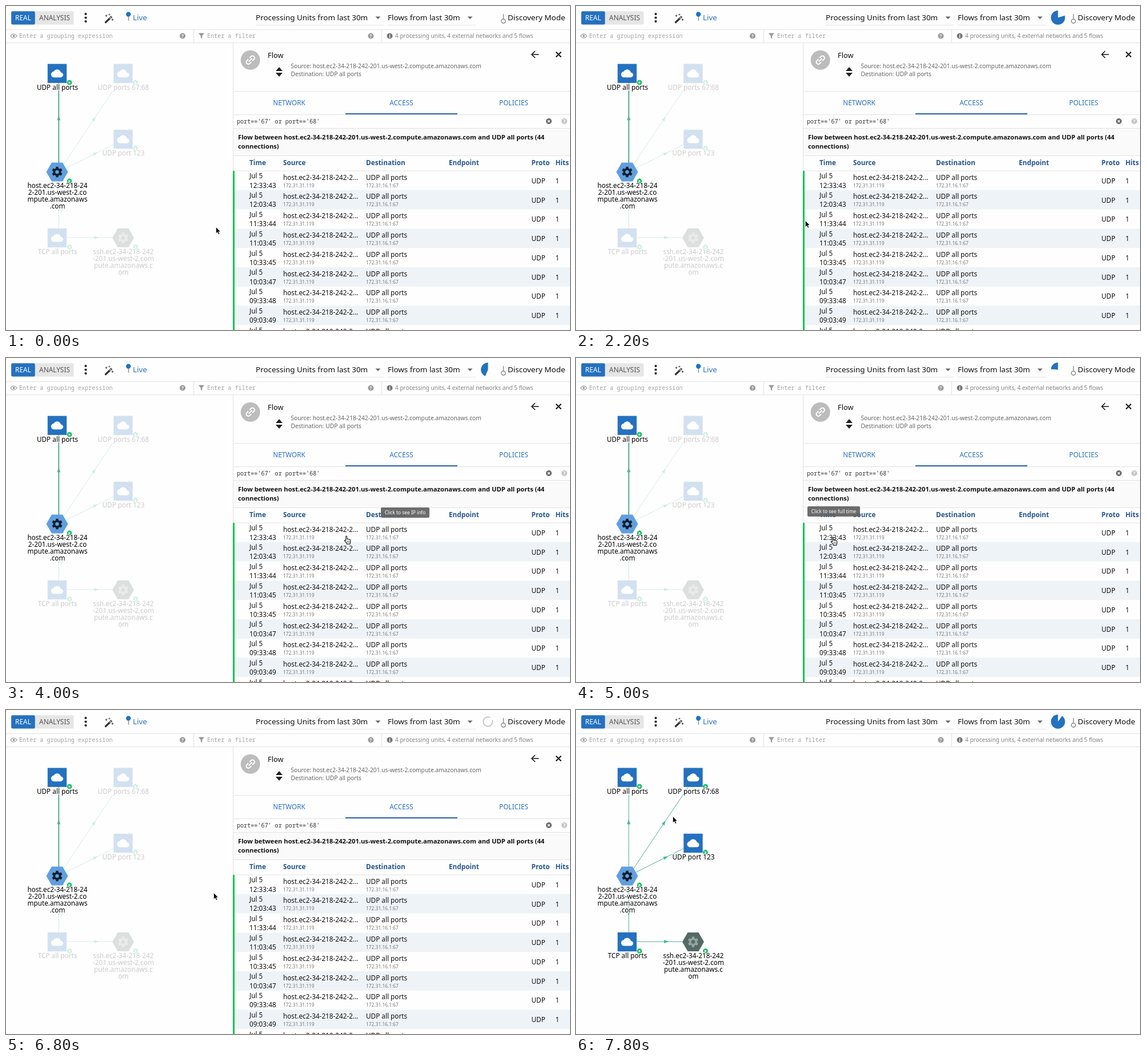
Recreate the animation shown at these times as an HTML page. Size 987x568 px, loop 8 s.

```html
<!DOCTYPE html>
<html lang="en">
<head>
<meta charset="utf-8">
<title>Network flow console</title>
<style>
  html, body { margin: 0; width: 100%; height: 100%; overflow: hidden; background: #fefefe; }
  svg { display: block; width: 987px; height: 568px; }
  text { font-family: "Noto Sans", sans-serif; font-size: 11.76px; fill: #111; white-space: pre; }
  .mono { font-family: "Noto Sans Mono", monospace; font-size: 10.1px; }
  .label { text-anchor: middle; fill: #000; stroke: #fefefe; stroke-width: 2.4px; paint-order: stroke; }
  .backing * { fill: #fefefe; stroke: #fefefe; }
</style>
</head>
<body>
<svg id="stage" viewBox="0 0 987 568"></svg>
<script>
const LOOP = 8000, STEP = 200;
const BLUE = '#2471bf', LINK = '#2a70b8', GREY = '#999', RULE = '#e2e2e2';
const HOST = 'host.ec2-34-218-242-201.us-west-2.compute.amazonaws.com';

const text = (x, y, s, attrs = '') => `<text x="${x}" y="${y}" ${attrs}>${s}</text>`;
const rect = (x, y, w, h, fill, attrs = '') =>
  `<rect x="${x}" y="${y}" width="${w}" height="${h}" fill="${fill}" ${attrs}/>`;
const circle = (x, y, r, fill, attrs = '') =>
  `<circle cx="${x}" cy="${y}" r="${r}" fill="${fill}" ${attrs}/>`;
const path = (d, fill, attrs = '') => `<path d="${d}" fill="${fill}" ${attrs}/>`;
const line = (d, stroke, width = 1, attrs = '') =>
  path(d, 'none', `stroke="${stroke}" stroke-width="${width}" ${attrs}`);
const group = (content, attrs) => `<g ${attrs}>${content}</g>`;
const at = (x, y, content) => group(content, `transform="translate(${x} ${y})"`);
const size = px => `font-size:${px}px;`;
const sign = (x, y, s, fill) => circle(x, y, 5, fill) +
  text(x, y + 3, s, `text-anchor="middle" style="${size(8.4)}font-weight:700;fill:#fff"`);

// Toolbar and filter row

function toolbar() {
  const big = `style="${size(13.44)}"`;
  const button = `text-anchor="middle" style="${size(11.9)}font-weight:500;fill:`;
  const dropdown = (x, caret, end, s) => text(x, 25, s, big) +
    path(`M${caret - 4.5} 18.5h9l-4.5 4.5z`, '#666') + line(`M${x} 33.5H${end}`, RULE);
  const dots = [14, 20.5, 27].map(y => circle(139.5, y, 2.1, '#222')).join('');
  const wand = line('M173.5 29.5L185 18.5', '#333', 3.2) + line('M181.5 22l2.5-2.4', '#fff', 1.2) +
    line('M175.5 15v4M173.5 17h4M181 13.5v3M179.5 15h3M186.5 22v4M184.5 24h4', '#444', 1);
  const hint = (x, s) => text(x, 56.3, s, 'class="mono" style="fill:#a4a4a4"');

  return rect(9.2, 9.2, 109.4, 23.2, '#e6e6e6', 'rx="2.5"') + rect(9.2, 9.2, 41.6, 23.2, BLUE, 'rx="2.5"') +
    text(30, 24.8, 'REAL', button + '#fff"') + text(85, 24.8, 'ANALYSIS', button + '#555"') +
    dots + wand +
    line('M214.5 16V26', '#8a8a8a', 1.4) + circle(214.2, 14.5, 4.2, '#1d73c4') +
    text(222, 25, 'Live', `style="${size(13.44)}fill:${LINK}"`) +
    dropdown(437, 651, 661, 'Processing Units from last 30m') +
    dropdown(668, 812, 822, 'Flows from last 30m') +
    line('M870.5 14V23', '#888', 1.3) + circle(870.5, 26.5, 3.6, '#fff', 'stroke="#777" stroke-width="1.3"') +
    text(878, 25, 'Discovery Mode', big) +
    line('M0 41.5H987M0 64.5H987M328.5 41V64M657.5 41V64', RULE) +
    line('M8 52.5Q13.5 45.5 19 52.5Q13.5 59.5 8 52.5Z', GREY, 1.2) + circle(13.5, 52.5, 1.9, GREY) +
    hint(23, 'Enter a grouping expression') + sign(309, 52.5, '?', GREY) +
    path('M337 47.5h10l-3.8 5v5l-2.4-2v-3z', GREY) +
    hint(352, 'Enter a filter') + sign(638.5, 52.5, '?', GREY) + sign(671.5, 52.5, 'i', '#777') +
    text(681, 56.2, '4 processing units, 4 external networks and 5 flows', `style="${size(10.08)}fill:#848484"`);
}

// Graph

const NODES = {
  all:  { x: 89.5, y: 118.2, lines: ['UDP all ports'] },
  dhcp: { x: 205, y: 118.2, lines: ['UDP ports 67:68'] },
  ntp:  { x: 205, y: 233.5, lines: ['UDP port 123'] },
  host: { x: 89.5, y: 291, lines: ['host.ec2-34-218-24', '2-201.us-west-2.co', 'mpute.amazonaws', '.com'],
          hex: '#609fdf', gear: '#0f1d2c' },
  tcp:  { x: 89.5, y: 406.5, lines: ['TCP all ports'] },
  ssh:  { x: 205, y: 406.5, lines: ['ssh.ec2-34-218-242', '-201.us-west-2.com', 'pute.amazonaws.c', 'om'],
          hex: '#536a65', gear: '#95a39f' }
};
const EDGES = [['host', 'all'], ['host', 'dhcp'], ['host', 'ntp'], ['host', 'tcp'], ['tcp', 'ssh']];
const CLOUD = 'M19.35 10.04C18.67 6.59 15.64 4 12 4 9.11 4 6.6 5.64 5.35 8.04 2.34 8.36 0 10.91 0 14' +
  'c0 3.31 2.69 6 6 6h13c2.76 0 5-2.24 5-5 0-2.64-2.05-4.78-4.65-4.96z';

function gearPath(teeth, outer, inner, hole) {
  const corners = [[inner, -19], [outer, -13], [outer, 13], [inner, 19]];
  const points = [];
  for (let i = 0; i < teeth; i++) {
    for (const [r, offset] of corners) {
      const a = (i * 360 / teeth + offset) * Math.PI / 180;
      points.push(`${(r * Math.sin(a)).toFixed(2)} ${(-r * Math.cos(a)).toFixed(2)}`);
    }
  }
  return `M${points.join('L')}ZM${-hole} 0a${hole} ${hole} 0 1 0 ${2 * hole} 0a${hole} ${hole} 0 1 0 ${-2 * hole} 0Z`;
}
const GEAR = gearPath(6, 9.4, 7, 3.3);

function edge([from, to]) {
  const a = NODES[from], b = NODES[to];
  const x = a.x + 2.8, y = a.y - 0.4, dx = b.x - a.x, dy = b.y - a.y;
  const angle = Math.atan2(dy, dx) * 180 / Math.PI;
  const arrow = path('M4 -3L12.5 0L4 3z', '#4bb899');
  return line(`M${x} ${y}l${dx} ${dy}`, '#4fae95', 1, to === 'all' ? 'id="mainEdge"' : '') +
    group(arrow, `transform="translate(${x + dx / 2} ${y + dy / 2}) rotate(${angle})"`);
}

function node({ x, y, lines, hex, gear }) {
  const icon = hex
    ? path('M-19 0L-9.5 -16.5H9.5L19 0L9.5 16.5H-9.5Z', hex) + path(GEAR, gear, 'fill-rule="evenodd"')
    : rect(-16.7, -16.7, 33.4, 33.4, BLUE) + group(path(CLOUD, '#fff'), 'transform="scale(.88) translate(-12 -12)"');
  const badge = at(21.6, 16, circle(0, 0, 4.4, '#1fbd62') + path('M-1.4 -2.2L2.2 0L-1.4 2.2z', '#fff'));
  const label = lines.map((s, i) => text(0.5, 28.4 + 11.9 * i, s, 'class="label"')).join('');
  return at(x, y, icon + badge + label);
}

function graph() {
  const active = ['all', 'host'];
  const rest = Object.keys(NODES).filter(key => !active.includes(key));
  const draw = keys => keys.map(key => node(NODES[key])).join('');
  // The opaque backing keeps edges from showing through faded nodes.
  return group(EDGES.slice(1).map(edge).join(''), 'id="otherEdges"') + edge(EDGES[0]) +
    group(draw(rest), 'class="backing"') + group(draw(rest), 'id="otherNodes"') + draw(active);
}

// Flow panel

function tableRow(time, i) {
  const y = 289 + 33.78 * i;
  const address = (x, s) => text(x, y + 28.7, s, `style="${size(8.4)}fill:#777"`);
  return (i % 2 ? rect(400, y, 587, 33.8, '#eef3f7') : '') +
    text(426, y + 13.4, 'Jul 5') + text(426, y + 29.7, time) +
    text(485, y + 15.6, 'host.ec2-34-218-242-2...') + address(485, '172.31.31.119') +
    text(630, y + 15.6, 'UDP all ports') + address(630, '172.31.16.1:67') +
    text(919.5, y + 21.8, 'UDP') + text(961.5, y + 21.8, '1');
}

function panel() {
  const times = ['12:33:43', '12:03:43', '11:33:44', '11:03:45', '10:33:45', '10:03:47', '09:33:48', '09:03:49', '08:33:50'];
  const heads = [[426, 'Time'], [485, 'Source'], [630, 'Destination'], [775, 'Endpoint'], [919.5, 'Proto'], [961.5, 'Hits']];
  const tabs = [[495.5, 'NETWORK'], [692, 'ACCESS'], [888.5, 'POLICIES']];
  const detail = `style="${size(10.22)}fill:#666"`;
  const title = `style="${size(11.2)}font-weight:700"`;
  const link = 'M-1.5 -3.5H-5.2a3.5 3.5 0 0 0 0 7H-1.5M1.5 -3.5H5.2a3.5 3.5 0 0 1 0 7H1.5M-4 0H4';

  return rect(397, 65, 590, 503, '#fefefe') + rect(397, 215, 590, 47, '#fafafa') +
    line('M397.5 65V568M397 149.5H987M397 190.5H987M397 214.5H987M397 262.5H987M397 289H987', RULE) +
    circle(427.7, 94.7, 17, '#bcbcbc') +
    group(line(link, '#fff', 2), 'transform="translate(427.7 94.7) rotate(-45)"') +
    text(458, 91, 'Flow', `style="${size(12.8)}"`) +
    path('M472 114h12l-6-7zM472 117h12l-6 7z', '#222') +
    text(498.5, 108.8, 'Source: ' + HOST, detail) + text(498.5, 123.2, 'Destination: UDP all ports', detail) +
    line('M932.5 85H920.5M926 79L920 85L926 91', '#111', 1.5) +
    line('M962.5 80.5l9 9M971.5 80.5l-9 9', '#111', 1.9) +
    tabs.map(([x, s]) => text(x, 174.2, s, `text-anchor="middle" style="fill:${LINK}"`)).join('') +
    rect(594, 188, 196, 2, '#2c6ca8') +
    text(404, 205.5, "port=='67' or port=='68'", 'class="mono" style="fill:#333"') +
    circle(950, 202, 5, '#666') + line('M948 200l4 4M952 200l-4 4', '#fff', 1.2) + sign(977, 202, '?', '#c4c4c4') +
    text(406, 234.3, `Flow between ${HOST} and UDP all ports (44`, title) + text(406, 250, 'connections)', title) +
    heads.map(([x, s]) => text(x, 279.3, s, 'style="font-weight:700;fill:#23568c"')).join('') +
    times.map(tableRow).join('') + rect(397, 289, 3, 279, '#12c455');
}

const tooltip = (id, x, y, w, s) => group(
  rect(x, y, w, 18, '#616161', 'rx="2" opacity=".93"') +
  text(x + w / 2, y + 12, s, `text-anchor="middle" style="${size(8.4)}fill:#fff"`), `id="${id}"`);

const ring = (id, x, y) => at(x, y,
  group(line('M8.2 0A8.2 8.2 0 1 1 6.28 -5.27', '#b5b5b5', 1.3), `id="${id}"`));

const HAND = 'M2.6 8V1.2q0-1.2 1-1.2t1 1.2V5.5q1.8-.9 2.2.3q1.6-.7 2.1.4q2-.4 2 1.3v2.8q0 1.3-.8 2.3v1.5H4.3' +
  'v-1.3L.5 8.7q-.6-1.6.8-1.5z';
const cursors =
  path('M0 0V11.6L2.7 9.1L4.5 13.2L6.5 12.3L4.7 8.4H8.2Z', '#000',
    'id="arrow" transform="translate(.4 -.6)" stroke="#fff" stroke-width=".8"') +
  group(path(HAND, '#fff', 'stroke="#222" stroke-width="1.1"') + line('M5 8v4M7 8v4M9 8v4', '#333', .7), 'id="hand"');

document.getElementById('stage').innerHTML =
  rect(0, 0, 987, 568, '#fefefe') + graph() + toolbar() + group(panel(), 'id="panel"') +
  path('', BLUE, 'id="pie"') + ring('topRing', 843.3, 20.3) + ring('panelRing', 964, 87) +
  tooltip('ipTip', 656, 262, 85, 'Click to see IP info') +
  tooltip('timeTip', 405, 260, 92, 'Click to see full time') +
  group(cursors, 'id="pointer"');

// Animation

const el = id => document.getElementById(id);
const show = (id, on) => el(id).setAttribute('display', on ? 'inline' : 'none');
const between = (t, from, to) => t >= from && t < to;

// time, x, y
const TRACK = [
  [0, 367, 388], [1400, 366, 388], [2000, 366, 388], [2800, 589, 316], [3200, 592, 312], [4000, 592, 312],
  [4800, 446, 314], [5400, 446, 314], [6400, 363, 321], [6800, 363, 321], [7000, 366, 312], [7800, 169, 187]
];

function pointerAt(t) {
  const i = TRACK.findIndex(key => key[0] > t);
  if (i < 0) return TRACK[TRACK.length - 1].slice(1);
  const [t0, x0, y0] = TRACK[i - 1], [t1, x1, y1] = TRACK[i];
  const p = (t - t0) / (t1 - t0), k = p * p * (3 - 2 * p);
  return [x0 + (x1 - x0) * k, y0 + (y1 - y0) * k];
}

// Five-second countdown: the missing sector grows clockwise from the top.
function piePath(elapsed) {
  const a = elapsed / 5000 * 2 * Math.PI, cx = 843.5, cy = 20.4, r = 12.4;
  return `M${cx} ${cy}L${cx + r * Math.sin(a)} ${cy - r * Math.cos(a)}` +
    `A${r} ${r} 0 ${a < Math.PI ? 1 : 0} 1 ${cx} ${cy - r}Z`;
}

function render(t) {
  const started = t >= 7310 ? 7310 : 1190;
  const counting = between(t, 1190, 6190) || t >= 7310;
  show('pie', counting);
  if (counting) el('pie').setAttribute('d', piePath(t - started));
  show('topRing', !counting && t >= 200);
  show('panelRing', between(t, 7000, 7400));
  for (const id of ['topRing', 'panelRing']) el(id).setAttribute('transform', `rotate(${(t * 0.3 + 100) % 360})`);

  const open = t < 7000;
  show('panel', open);
  el('otherNodes').setAttribute('opacity', open ? .2 : t < 7200 ? .52 : t < 7400 ? .82 : 1);
  el('otherEdges').setAttribute('opacity', open ? .24 : t < 7200 ? .65 : 1);
  el('mainEdge').setAttribute('stroke-width', open ? 2 : t < 7200 ? 1.2 : 1);

  show('ipTip', between(t, 3000, 4200));
  show('timeTip', between(t, 4800, 5600));

  const [x, y] = pointerAt(t);
  const overCell = open && x > 425 && y > 289 && y < 330;
  el('pointer').setAttribute('transform', `translate(${x} ${y})`);
  show('arrow', !overCell);
  show('hand', overCell);
}

const start = performance.now();
function tick() {
  const t = (performance.now() - start) % LOOP;
  render(Math.floor(t / STEP) * STEP);
  requestAnimationFrame(tick);
}
tick();
</script>
</body>
</html>
```
